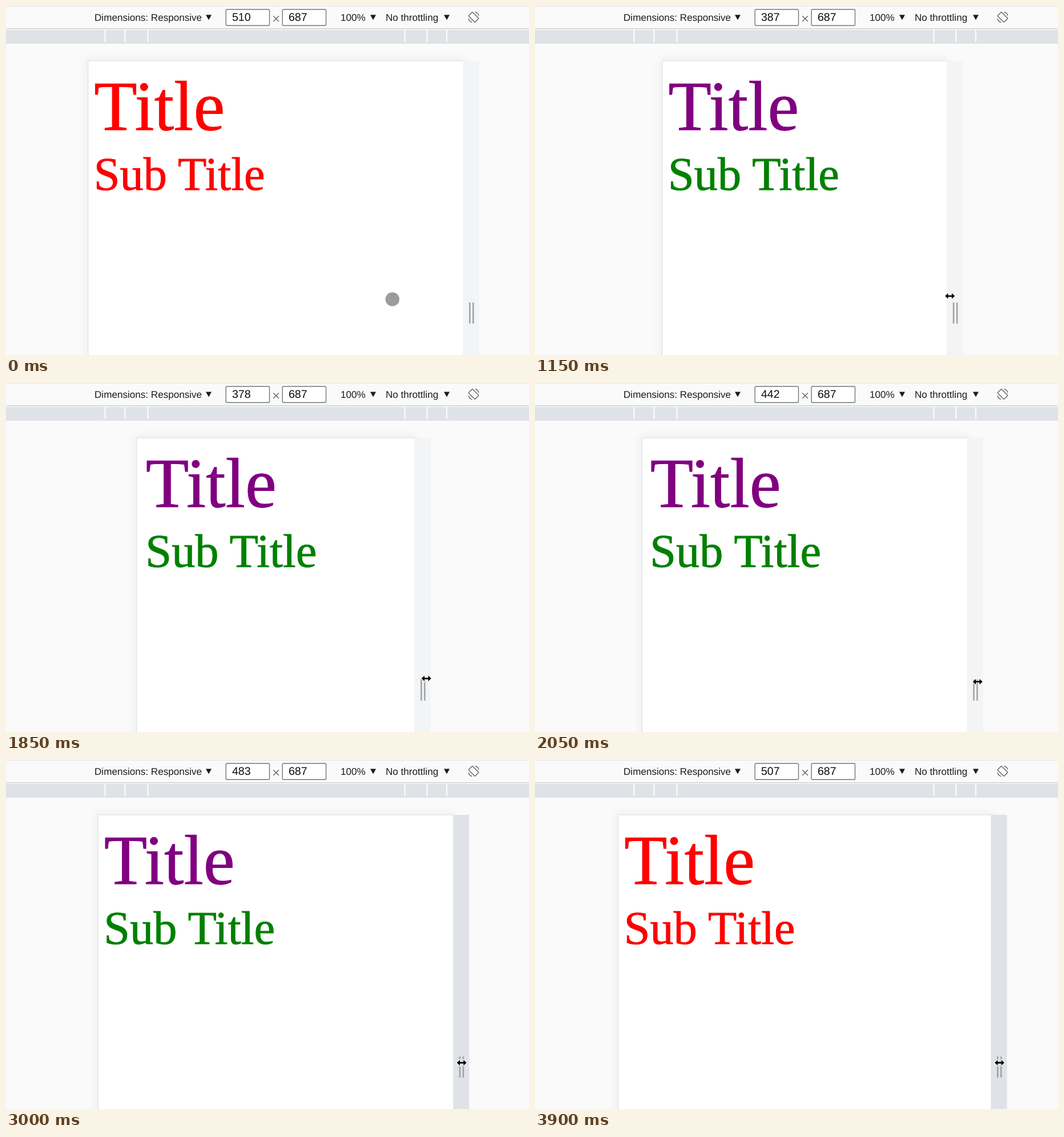
Write an HTML page that moves like this. It is 916x611 px and loops after 4770 ms.

```html
<!DOCTYPE html>
<html lang="en">
<head>
<meta charset="utf-8">
<title>Responsive title demo</title>
<style>
  html, body { margin: 0; width: 100%; height: 100%; overflow: hidden; background: #fafafa; }
  svg { display: block; width: 100%; height: 100%; }
  text { text-rendering: geometricPrecision; }
  .ui { font: 17.1px "Liberation Sans", Arial, sans-serif; fill: #1b1c1f; }
  .num { font: 19.5px "Liberation Sans", Arial, sans-serif; fill: #0c0c0c; }
  .doc { font-family: "Liberation Serif", "Times New Roman", serif; font-kerning: normal; stroke-width: .7; }
  .field { fill: #fff; stroke: #76777a; stroke-width: 1.4; }
  .line { fill: none; stroke: #5f6368; stroke-width: 1.4; }
</style>
</head>
<body>
<svg viewBox="0 0 916 611">
  <defs>
    <filter id="blur" x="-20%" y="-20%" width="140%" height="140%">
      <feGaussianBlur stdDeviation="6"/>
    </filter>
  </defs>
  <rect width="916" height="611" fill="#fafafa"/>

  <rect id="shadow" y="89" height="640" rx="12" fill="#365048" opacity=".045" filter="url(#blur)"/>
  <rect id="edge" y="95.5" height="620" fill="#d9dcdf"/>
  <rect id="page" y="96.5" height="620" fill="#fff"/>
  <g id="bar">
    <rect id="track" y="96" width="28" height="515"/>
    <path d="M11.8 519V556M17.8 519V556" stroke="#a0a1a2" stroke-width="2.5"/>
  </g>
  <g id="content" class="doc">
    <text id="title" x="7.9" y="93.8" font-size="96">Title</text>
    <g id="subs" font-size="64">
      <text id="sub" x="7.5" y="175.3">Sub Title</text>
      <text id="sub2" x="7.5" y="249.8">Title</text>
    </g>
  </g>

  <rect width="916" height="39" fill="#fafafa"/>
  <rect width="916" height="1" fill="#e4e5e6"/>
  <rect y="39" width="916" height="1.6" fill="#c9cccf"/>
  <rect y="40.6" width="916" height="1.6" fill="#fafafa"/>
  <rect y="42" width="916" height="24" fill="#dfe2e7"/>
  <path d="M173.5 42V63M208.5 42V63M248.5 42V63M698.5 42V63M737.5 42V63M772 42V63" stroke="#fafafa" stroke-width="2.4"/>

  <text class="ui" x="155" y="25.8">Dimensions: Responsive</text>
  <text class="ui" x="586" y="25.8">100%</text>
  <text class="ui" x="665" y="25.8">No throttling</text>
  <path d="M350 15.5h10l-5 9zM638 15.5h10l-5 9zM767 15.5h10l-5 9z" fill="#1b1c1f"/>
  <rect class="field" x="385.2" y="6" width="76.3" height="28.3" rx="2"/>
  <rect class="field" x="484.2" y="6" width="76.3" height="28.3" rx="2"/>
  <text id="width" class="num" x="396" y="26"></text>
  <text class="num" x="495" y="26">687</text>
  <path class="line" d="M468.3 17.5l9.6 9.6m0-9.6l-9.6 9.6"/>
  <g class="line" transform="translate(819 19.5) rotate(-45)">
    <rect x="-4.8" y="-8" width="9.6" height="16" rx="1"/>
    <path d="M8.4 -4.5A9.5 9.5 0 0 1 8.4 4.5M-8.4 4.5A9.5 9.5 0 0 1 -8.4 -4.5"/>
  </g>

  <circle id="touch" cx="676.8" cy="513.4" r="12.2" fill="#9b9b9b"/>
  <path id="pointer" d="M0 0V16L3.8 12.5L6.3 18.2L8.7 17.1L6.2 11.5H11.5Z" fill="#000" stroke="#fff" stroke-width="1.2"/>
  <path id="resize" d="M-8.5 0L-3.2 -5V-1.4H3.2V-5L8.5 0L3.2 5V1.4H-3.2V5Z" fill="#000" stroke="#fff" stroke-width="2" paint-order="stroke"/>
</svg>
<script>
const LOOP = 4770, STEP = 50, LAG = 22;
const SCALE = 1.287, CENTER = 472.3;
const TITLE_MIN = 186, WRAP_AT = 250, BREAKPOINT = 500;

const el = id => document.getElementById(id);
const set = (id, attrs) => {
  for (const k in attrs) el(id).setAttribute(k, attrs[k]);
};
const show = (id, on) => { el(id).style.display = on ? '' : 'none'; };
const place = (id, x, y) => set(id, { transform: `translate(${x} ${y})` });
const paint = (id, color) => set(id, { fill: color, stroke: color });

const ramp = (t, from, to) => Math.min(1, Math.max(0, (t - from) / (to - from)));
const smooth = u => u * u * (3 - 2 * u);
const easeOut = u => 1 - (1 - u) ** 2;
const bezier = (u, a, b, c) => (1 - u) ** 2 * a + 2 * u * (1 - u) * b + u * u * c;

// Grab, squeeze, release outward, then a second short drag.
const widthAt = t => 510
  - 2 * ramp(t, 700, 800)
  - 343 * smooth(ramp(t, 950, 1450))
  + 320 * easeOut(ramp(t, 1450, 2400))
  - 2 * ramp(t, 2950, 3000)
  + 24 * smooth(ramp(t, 3000, 3450));

const pageLeft = w => CENTER - w * SCALE / 2;

function drawCursor(t, right, trail) {
  show('touch', t < 50);
  show('pointer', t >= 50 && t < 600);
  show('resize', t >= 600);

  const u = smooth(ramp(t, 150, 700));
  const approachX = bezier(u, 877, 930, 798), approachY = bezier(u, 440, 470, 509);
  place('pointer', approachX, approachY);
  if (t < 700) {
    place('resize', approachX, approachY);
  } else {
    const drag = ramp(t, 950, 1450);
    const y = 509 - 3 * drag + 24 * ramp(t, 1450, 2300);
    place('resize', right - 1 + 16 * drag + trail, y);
  }
}

function render(time) {
  const t = Math.floor(time / STEP) * STEP;
  const w = Math.round(widthAt(t));
  const left = pageLeft(w), right = left + w * SCALE;

  set('shadow', { x: left - 7, width: w * SCALE + 14 });
  set('edge', { x: left - 0.8, width: w * SCALE + 0.8 });
  set('page', { x: left + 0.2, width: w * SCALE });
  place('bar', right, 0);
  const pressed = (t >= 750 && t < 1050) || t >= 3000;
  set('track', { fill: pressed ? '#dfe2e7' : '#f2f4f6' });
  el('width').textContent = w;

  // While the frame grows, its content trails slightly behind.
  const trail = Math.max(0, widthAt(t) - widthAt(t - LAG)) * SCALE / 2;
  const zoom = SCALE * Math.min(1, w / TITLE_MIN);
  set('content', { transform: `translate(${left + trail} 96) scale(${zoom})` });

  const wide = w >= BREAKPOINT, wrapped = w < WRAP_AT;
  paint('title', wide ? '#ff0000' : '#800080');
  paint('subs', wide ? '#ff0000' : '#008000');
  el('sub').textContent = wrapped ? 'Sub' : 'Sub Title';
  show('sub2', wrapped);

  drawCursor(t, right, trail);
}

const start = performance.now();
function tick() {
  render((performance.now() - start) % LOOP);
  requestAnimationFrame(tick);
}
tick();
</script>
</body>
</html>
```
